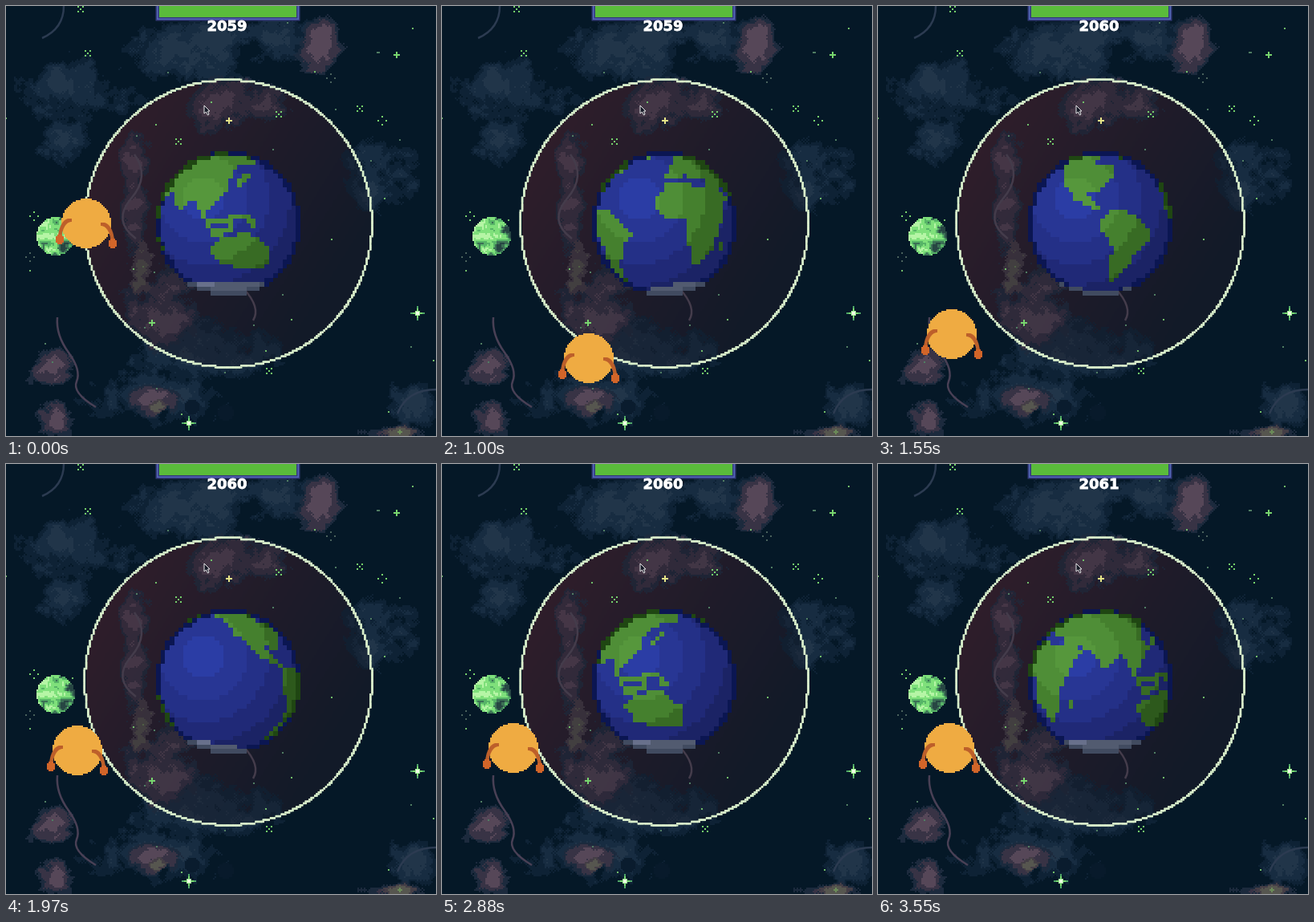
An HTML page with a canvas that plays this animation: 536x536 px, repeating every 3.8 s.

```html
<!DOCTYPE html>
<html lang="en">
<head>
<meta charset="utf-8">
<title>Planet defence</title>
<style>
html, body { margin: 0; width: 100%; height: 100%; overflow: hidden; background: #051828; }
canvas { position: absolute; left: 0; top: 0; }
#count {
  position: absolute; left: 175px; top: 13px; width: 201px; text-align: center;
  font: bold 18px/23px "DejaVu Sans", sans-serif; color: #fff; -webkit-text-stroke: .8px #fff;
}
</style>
</head>
<body>
<canvas id="stage" width="536" height="536"></canvas>
<div id="count">2059</div>
<script>
const SIZE = 536, LOOP = 3800, CX = 277, CY = 271, RING = 179, RAD = Math.PI / 180;
const stage = document.getElementById('stage').getContext('2d');
const counter = document.getElementById('count');

// The picture is held still between these moments.
const beats = [0, 250, 500, 750, 1000, 1150, 1310, 1550, 1720, 1970, 2220, 2470, 2630, 2880, 3130, 3300, 3550];

// Motion: each glide is an exponential approach that begins at a given time.
const glide = (t, start) => t < start ? 0 : 1 - Math.exp((start - t) / 150);
const coinX = t => 100 + 84 * glide(t, 320) - 95 * glide(t, 1050);
const coinY = t => 271 + 168 * glide(t, 100) - 85 * glide(t, 1485);
const facing = t => 122 - t * 360 / 3130 - 27 * Math.max(0, Math.sin(Math.PI * (t - 500) / 2630));
const score = t => 2059 + (t >= 1150) + (t >= 3130);

function newCanvas(w, h) {
  const c = document.createElement('canvas');
  c.width = w; c.height = h;
  return c.getContext('2d');
}
const pairs = list => list.split(' ').map(p => p.split(',').map(Number));
const clamp = (v, lo, hi) => Math.max(lo, Math.min(hi, v));
const mix = (a, b, k) => a.map((v, i) => v + (b[i] - v) * k);

function hash(x, y) {
  const s = Math.sin(x * 127.1 + y * 311.7) * 43758.5453;
  return s - Math.floor(s);
}
function noise(x, y) {
  const ix = Math.floor(x), iy = Math.floor(y);
  const ease = v => v * v * (3 - 2 * v), u = ease(x - ix), v = ease(y - iy);
  const top = hash(ix, iy) * (1 - u) + hash(ix + 1, iy) * u;
  const low = hash(ix, iy + 1) * (1 - u) + hash(ix + 1, iy + 1) * u;
  return top * (1 - v) + low * v;
}
const cloud = (x, y) => noise(x / 30, y / 30) * .5 + noise(x / 13, y / 13) * .3 + noise(x / 5, y / 5) * .2;

function disc(g, cx, cy, rx, ry, color, cell = 2) {
  for (let y = -ry; y < ry; y += cell)
    for (let x = -rx; x < rx; x += cell) {
      const mx = x + cell / 2, my = y + cell / 2;
      if ((mx / rx) ** 2 + (my / ry) ** 2 > 1) continue;
      g.fillStyle = typeof color === 'function' ? color(mx, my) : color;
      g.fillRect(Math.round(cx + x), Math.round(cy + y), cell, cell);
    }
}

// Each nebula layer: three tones and soft blobs given as x,y,rx,ry
const nebulae = [
  [[[14, 34, 53], [23, 44, 65], [33, 53, 73]],
    '85,108,76,42 75,165,36,32 240,60,78,42 350,35,50,32 465,215,46,44 245,425,90,46 185,490,110,34 510,500,40,32'],
  [[[28, 42, 61], [56, 51, 69], [86, 71, 88]],
    '392,46,34,34 285,122,66,36 162,180,20,34 160,270,18,54 55,450,34,24 65,512,28,22 200,365,48,60 180,495,36,22 480,532,52,14'],
  [[[68, 62, 70], [86, 86, 79], [108, 140, 88]], '170,325,17,42 190,500,14,10 488,530,28,9']
].map(([tones, blobs]) => [tones, pairs(blobs)]);

function skyColor(x, y, dither) {
  const inside = Math.hypot(x - CX, y - CY) < RING;
  const across = clamp(((x - 130) * .85 + (y - 180) * .53) / 318, 0, 1);
  let rgb = [5, 24, 39];
  if (inside) rgb = mix(rgb, [75, 33, 45], .58 - .39 * across);
  const base = rgb, grain = (cloud(x, y) - .5) * 2.6 + dither;
  for (const [tones, blobs] of nebulae) {
    const best = Math.max(...blobs.map(([bx, by, rx, ry]) => 1 - ((x - bx) / rx) ** 2 - ((y - by) / ry) ** 2));
    const v = best + grain;
    if (best > -.6 && v > .15)
      rgb = mix(base, tones[v > 1 ? 2 : v > .5 ? 1 : 0], inside ? .6 : 1);
  }
  return rgb;
}
function paintSky(g) {
  const n = SIZE / 2, small = newCanvas(n, n), image = small.createImageData(n, n);
  for (let y = 0; y < n; y++) for (let x = 0; x < n; x++)
    image.data.set([...skyColor(x * 2, y * 2, (x + y) % 2 * .1 - .05), 255], (y * n + x) * 4);
  small.putImageData(image, 0, 0);
  g.drawImage(small.canvas, 0, 0, SIZE, SIZE);
}

function paintWisps(g) {
  const curve = (path, color) => { g.strokeStyle = color; g.lineWidth = 2.5; g.stroke(new Path2D(path)); };
  curve('M64 388Q62 410 78 432T88 468T112 500', '#494055');
  curve('M45 40Q72 28 72 0M488 508Q500 478 536 478', '#2c3b51');
  curve('M296 352Q318 376 308 392M160 185Q180 212 156 240T162 290', '#443c4b');
  disc(g, 274, 507, 10, 10, '#081a2b');
  disc(g, 232, 500, 9, 9, '#0a1c2e');
}

function paintStars(g) {
  const green = '#78d66e';
  const dot = (x, y, color, w = 2, h = w) => {
    g.fillStyle = color;
    g.fillRect(x - w / 2, y - h / 2, w, h);
  };
  const plus = (x, y, r, color) => { dot(x, y, color, r * 2, 2); dot(x, y, color, 2, r * 2); };
  const around = (x, y, r, turn, color) => {
    for (let a = turn; a < 360; a += 90) dot(x + r * Math.cos(a * RAD), y + r * Math.sin(a * RAD), color);
  };
  for (let i = 1; i <= 36; i++)
    dot(Math.round(hash(i, 3) * SIZE), Math.round(hash(i, 8) * SIZE), i % 2 ? '#507d63' : '#70bd69');
  for (const [x, y] of pairs('93,4 102,59 340,135 215,169 328,455 441,128')) {
    dot(x, y, green);
    around(x, y, 4.2, 45, green);
  }
  for (const [x, y] of pairs('469,143 35,262')) around(x, y, 5, 0, green);
  for (const [x, y] of pairs('405,90 30,313')) around(x, y, 5, 0, '#4a625d');
  plus(487, 61, 4, green);
  plus(182, 395, 4, green);
  plus(278, 143, 4, '#e6e587');
  for (const [x, y] of pairs('513,383 228,520')) {
    plus(x, y, 9, '#4fa768');
    plus(x, y, 6, green);
    dot(x, y, '#a2ef9b', 6);
    dot(x, y, '#efffe4', 4);
  }
}

function paintRing(g) {
  const snap = v => Math.round(v / 2.3) * 2.3;
  g.fillStyle = '#d9efcb';
  for (let a = 0; a < 360; a += .25)
    g.fillRect(CX - 1 + snap(RING * Math.cos(a * RAD)), CY - 1 + snap(RING * Math.sin(a * RAD)), 2.3, 2.3);
}

function paintMoon(g) {
  disc(g, 62, 287, 24, 24, (x, y) => {
    const v = noise(x / 8 + 40, y / 8 + 9) * .8 + noise(x / 3, y / 3) * .4 - (x + y * .3) / 60;
    return v > .85 ? '#b5f5a5' : v > .6 ? '#7fe07b' : v > .42 ? '#57b467' : v > .22 ? '#3c7055' : '#274643';
  });
}

function makeBackground() {
  const g = newCanvas(SIZE, SIZE);
  g.imageSmoothingEnabled = false;
  [paintSky, paintWisps, paintStars, paintRing, paintMoon].forEach(paint => paint(g));
  return g.canvas;
}

// Rough coastlines as longitude,latitude
const lands = [
  '-168,66 -125,71 -82,68 -94,58 -60,54 -81,26 -97,28 -88,20 -78,8 -105,20 -124,42 -140,59',
  '-80,8 -60,10 -35,-7 -56,-36 -66,-57 -75,-50 -71,-20 -81,-5',
  '-17,15 -6,35 32,31 51,12 40,-5 38,-20 22,-36 12,-17 8,5 -8,5',
  '-9,37 5,60 22,70 105,78 178,69 157,53 138,54 121,38 122,28 103,8 91,22 78,8 66,25 50,29 58,22 45,13 35,30 36,37 12,42',
  '106,-20 118,-11 139,-6 158,-21 162,-36 146,-41 115,-34'
];
const islands = ['97,13 106,0 121,3 137,6 144,-3', '108,-7 125,-6 125,3', '131,32 143,43', '45,-23 49,-15', '-40,64 -35,80'];

function makeLandMap() {
  const g = newCanvas(360, 180);
  g.translate(180, 90);
  g.scale(1, -1);
  g.lineWidth = 4;
  const trace = list => { g.beginPath(); pairs(list).forEach(p => g.lineTo(...p)); };
  lands.forEach(l => { trace(l); g.fill(); });
  islands.forEach(l => { trace(l); g.stroke(); });
  return g.getImageData(0, 0, 360, 180).data;
}
const landMap = makeLandMap();
function surface(lon, lat) {
  if (lat < -56 - 12 * Math.max(0, Math.cos((lon + 75) * RAD))) return 'ice';
  const col = ((Math.floor(lon) + 180) % 360 + 360) % 360;
  return landMap[(Math.floor(90 - lat) * 360 + col) * 4 + 3] > 110 ? 'land' : 'sea';
}

// Lit to shaded
const shades = {
  sea: ['#2b3da5', '#283694', '#243087', '#202977', '#1b2365', '#0b1652'],
  land: ['#56973c', '#4f8e37', '#45802e', '#386b24', '#2d591c', '#1f4612'],
  ice: ['#8188ab', '#8188ab', '#747c9c', '#68708b', '#525b70', '#414b60']
};
const globe = newCanvas(32, 32);
function drawPlanet(lon0) {
  globe.clearRect(0, 0, 32, 32);
  disc(globe, 16, 16, 16, 16, (x, y) => {
    const lat = Math.asin(-y / 16) / RAD;
    const lon = lon0 + Math.asin(clamp(x / Math.sqrt(256 - y * y), -1, 1)) / RAD;
    const glow = Math.hypot(x + 5.5, y + 5.5), rim = Math.hypot(x, y) > 15;
    return shades[surface(lon, lat)][rim ? 5 : Math.min(4, Math.floor(glow / 4.8))];
  }, 1);
  stage.drawImage(globe.canvas, CX - 90, CY - 90, 180, 180);
}

function drawArm(x, y, side, drop) {
  stage.fillStyle = '#bd602b';
  for (let a = 0; a <= 90; a += 4)
    stage.fillRect(x + side * (20 + 13 * Math.sin(a * RAD)) - 2, y + drop - 24 * Math.cos(a * RAD) - 2, 4, 4);
  disc(stage, x + side * 33, y + drop, 5, 6, '#d26529');
}
function drawCoin(x, y) {
  disc(stage, x, y, 31, 31, '#efab42');
  drawArm(x, y, -1, 20);
  drawArm(x, y, 1, 25);
}

function drawHud() {
  ['#343a7b', '#5367b9', '#343a7b', '#5abb3b'].forEach((color, i) => {
    stage.fillStyle = color;
    stage.fillRect(186.5 + i * 1.5, 0, 180 - i * 3, 18.5 - i * 1.5);
  });
  const arrow = new Path2D('M247 124V134L249.5 132L251.5 136L253 135L251.5 131H254Z');
  stage.fillStyle = '#171b28';
  stage.fill(arrow);
  stage.strokeStyle = '#e7e7e8';
  stage.stroke(arrow);
}

const background = makeBackground();
stage.imageSmoothingEnabled = false;
let shown;
function render(now) {
  const elapsed = now % LOOP, t = beats.filter(b => b <= elapsed).pop();
  if (t === shown) return;
  shown = t;
  stage.drawImage(background, 0, 0);
  drawPlanet(facing(t));
  drawCoin(Math.round(coinX(t)), Math.round(coinY(t)));
  drawHud();
  counter.textContent = score(t);
}
const start = performance.now();
function tick() {
  render(performance.now() - start);
  requestAnimationFrame(tick);
}
tick();
</script>
</body>
</html>
```
